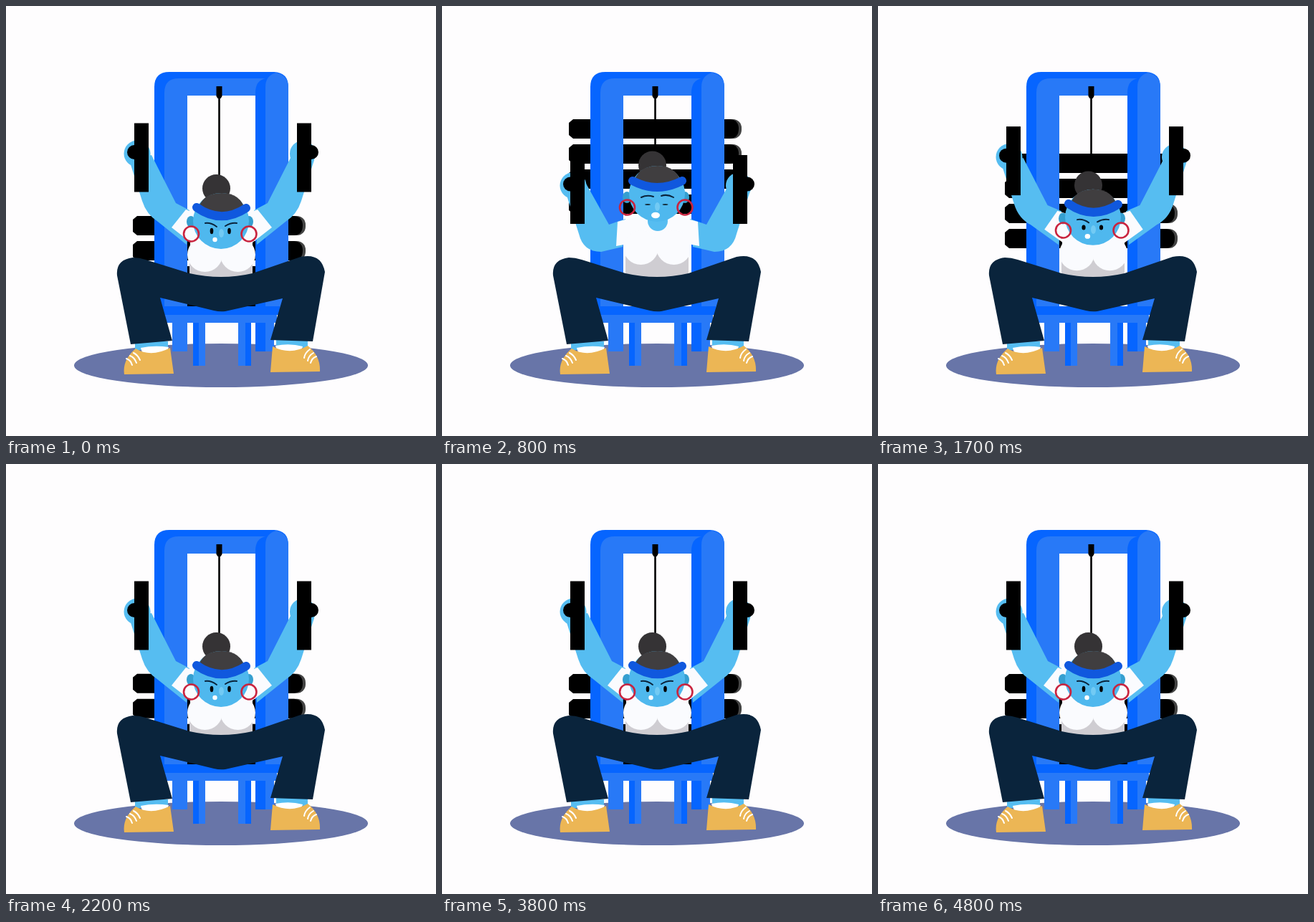
Write an HTML page that moves like this. It is 600 px wide and 600 px high and loops after 5000 ms.

```html
<!DOCTYPE html>
<html lang="en">
<head>
<meta charset="utf-8">
<title>Pulldown machine</title>
<style>
  html, body { margin: 0; width: 100%; height: 100%; overflow: hidden; background: #fefdfe; }
  svg { display: block; width: 100vw; height: 100vh; }
  .deep { fill: #0665ff; }
  .soft { fill: #2879f7; }
  .skin { fill: #56bdf1; }
  .face { fill: #4fb8ee; }
  .shirt { fill: #fafbfe; }
  .shoe { fill: #ecb655; }
  .line { fill: none; stroke-linecap: round; }
  .lace { stroke: #fff; stroke-width: 2; }
  .brow { stroke: #0a243c; stroke-width: 2; }
  .ring { stroke: #c9243f; stroke-width: 2.6; }
</style>
</head>
<body>
<svg viewBox="0 0 600 600">
  <defs>
    <g id="bar">
      <rect x="370" y="293" width="48" height="27" rx="12" fill="#444"/>
      <path d="M183 293H402Q414 294 414 306.500Q414 319 402 320H183L177 315V298Z"/>
    </g>
  </defs>

  <ellipse cx="300" cy="501.500" rx="205" ry="30.500" fill="#6875a8"/>

  <path d="M297.500 128V300" stroke="#000" stroke-width="2.600"/>
  <g id="weights">
    <use href="#bar"/>
    <use href="#bar" y="35"/>
    <use href="#bar" y="70"/>
    <use href="#bar" y="105"/>
  </g>

  <!-- machine -->
  <path class="deep" d="M207 422V113Q207 92 228 92H374Q394 93 394 113V422H348V125H253V422Z"/>
  <path class="soft" d="M221 422V121Q221 101 241 101H362Q348 104 348 121V125H253V422Z"/>
  <path class="soft" d="M362 422V113Q362 97 377 93Q394 97 394 114V422Z"/>
  <path d="M293.500 112H301.500V126L299.500 129H295.500L293.500 126Z"/>
  <path class="soft" d="M232 440H253V482H232ZM362 440H374V482H362Z"/>
  <path class="deep" d="M348 440H362V482H348ZM261 440H269V502H261ZM334 440H342V502H334Z"/>
  <path class="soft" d="M269 440H278V502H269ZM324 440H334V502H324Z"/>
  <path class="soft" d="M222 430H378V442H222Z"/>
  <path class="deep" d="M216 419H382V431H216Z"/>

  <!-- arms -->
  <g id="hands" class="skin">
    <circle cx="183" cy="206" r="18.500"/>
    <circle cx="414" cy="206" r="18"/>
  </g>
  <g id="arm">
    <path id="limb" class="skin"/>
    <path id="sleeve" class="shirt"/>
  </g>
  <use href="#arm" transform="translate(602) scale(-1 1)"/>

  <!-- torso -->
  <path class="shirt" d="M257 350V300Q300 285 344 300V350Z"/>
  <path fill="#cfcdd2" d="M256 345H344V376Q300 386 256 376Z"/>
  <g id="bust" class="shirt">
    <ellipse cx="277.500" cy="347" rx="24.500" ry="24"/>
    <ellipse cx="323.500" cy="347" rx="24.500" ry="24"/>
  </g>
  <circle class="skin" cx="301" cy="300" r="14"/>

  <!-- legs -->
  <path class="skin" d="M180 468H226V480H180ZM377 466H421V477H377Z"/>
  <path fill="#fff" d="M188 477Q207 473 227 476L222 490H192ZM376 474Q396 470 414 475L410 488H380Z"/>
  <path class="shoe" d="M181 478Q202 491 229 477L234 513L165 514Q162 494 181 478Z"/>
  <path class="shoe" d="M372 475Q397 488 421 474Q439 488 438 510L369 511Z"/>
  <path class="line lace" d="M168 492Q174 494 176 501M173 488Q179 490 182 498M178 484Q184 487 187 494"/>
  <path class="line lace" d="M424 479Q417 484 416 491M429 484Q422 488 421 495M433 489Q427 491 425 498"/>
  <path fill="#0a243c" d="M155 376Q153 354 177 351Q186 351 195 354L256 373Q300 383 344 373L411 350Q440 344 445 371L428 468L369 466L386 408L306 426Q298 427 290 425L215 407L232 467L174 472Z"/>

  <!-- head -->
  <g id="ears" fill="#359fd0">
    <ellipse cx="258" cy="301" rx="6" ry="8"/>
    <ellipse cx="339" cy="301" rx="6" ry="8"/>
  </g>
  <circle id="bun" cx="293.500" cy="254.500" r="19.500" fill="#353335"/>
  <g id="skull">
    <circle class="face" cx="300" cy="300" r="39"/>
    <path fill="#403e40" d="M267 287Q272 261 301 261Q328 261 334 286Q300 305 267 287Z"/>
  </g>
  <path id="band" class="line" stroke="#1058de" stroke-width="12"/>
  <g id="look">
    <ellipse cx="300.500" cy="317" rx="3.500" ry="6" fill="#72caf4"/>
    <ellipse class="eye" cx="287" cy="314"/>
    <ellipse class="eye" cx="311.500" cy="314"/>
  </g>
  <path id="brows" class="line brow"/>
  <ellipse id="mouth" fill="#fff"/>
  <g id="rings" class="line ring">
    <circle cx="258.500" cy="318" r="10.500"/>
    <circle cx="339" cy="318" r="10.500"/>
  </g>

  <!-- handles -->
  <g id="grips">
    <g id="grip">
      <rect x="179" y="163.500" width="20" height="96"/>
      <circle cx="179" cy="204" r="10"/>
    </g>
    <use href="#grip" transform="translate(605) scale(-1 1)"/>
  </g>
</svg>
<script>
  const LOOP = 5000, STEP = 100;
  const $ = id => document.getElementById(id);
  const eyes = document.querySelectorAll('.eye');

  const ease = (t, from, to) => {
    const k = Math.min(1, Math.max(0, (t - from) / (to - from)));
    return k * k * (3 - 2 * k);
  };
  const mix = (a, b, k) => a + (b - a) * k;
  const shift = (id, y) => $(id).setAttribute('transform', `translate(0 ${y})`);
  const set = (el, attrs) => {
    for (const name in attrs) el.setAttribute(name, attrs[name]);
  };

  // Fills a path pattern with numbers blended between two poses.
  const morph = (id, pattern, rest, pull, k) => {
    let i = 0;
    const d = pattern.replace(/#/g, () => mix(rest[i], pull[i++], k).toFixed(2) + ' ');
    $(id).setAttribute('d', d);
  };

  const limbRest = [172, 215, 190, 272, 196, 291, 212, 301, 252, 333, 256, 285, 237, 275, 203, 208];
  const limbPull = [172, 258, 191, 318, 197, 343, 222, 343, 252, 336, 256, 297, 233, 305, 200, 246];
  const sleeveRest = [251, 284, 231, 309, 258, 330, 280, 320, 280, 295];
  const sleevePull = [245, 301, 243, 335, 258, 332, 280, 330, 275, 293];
  const browRest = [278, 303, 286, 302, 294, 308, 306, 307, 314, 302, 322, 303];
  const browPull = [278, 267, 286, 263, 295, 266, 306, 265, 314, 262, 323, 267];

  function draw(t) {
    const arm = ease(t, 0, 700) - ease(t, 1300, 1800);
    const head = ease(t, 0, 750) - ease(t, 1200, 1850);
    const lift = ease(t, 0, 800) - ease(t, 1350, 2220);

    shift('weights', -135 * lift);
    shift('grips', 44.5 * arm);
    shift('hands', 44.5 * arm);
    morph('limb', 'M##L##Q####L##L##L##L##Z', limbRest, limbPull, arm);
    morph('sleeve', 'M##L##L##L##L##Z', sleeveRest, sleevePull, arm);

    shift('bust', -10 * Math.min(1, head * 1.25));
    shift('bun', -32.5 * head);
    shift('skull', -38 * head);
    shift('ears', -34 * head);
    shift('rings', -37 * head);
    shift('look', -37 * head);
    morph('band', 'M##Q####', [266, 281, 300, 305, 335, 282], [266, 244, 300, 262, 335, 244], head);
    morph('brows', 'M##Q####M##Q####', browRest, browPull, head);

    const shut = Math.min(1, head * 1.4);
    eyes.forEach(eye => set(eye, { rx: mix(2.3, 4, shut), ry: mix(4.2, 0.7, shut) }));
    set($('mouth'), {
      cx: mix(291.5, 298, head), cy: mix(326, 292, head),
      rx: mix(3.2, 6, shut), ry: mix(3.2, 4.2, shut)
    });
  }

  const start = performance.now();
  function tick() {
    const t = (performance.now() - start) % LOOP;
    draw(Math.floor(t / STEP) * STEP);
    requestAnimationFrame(tick);
  }
  tick();
</script>
</body>
</html>
```
